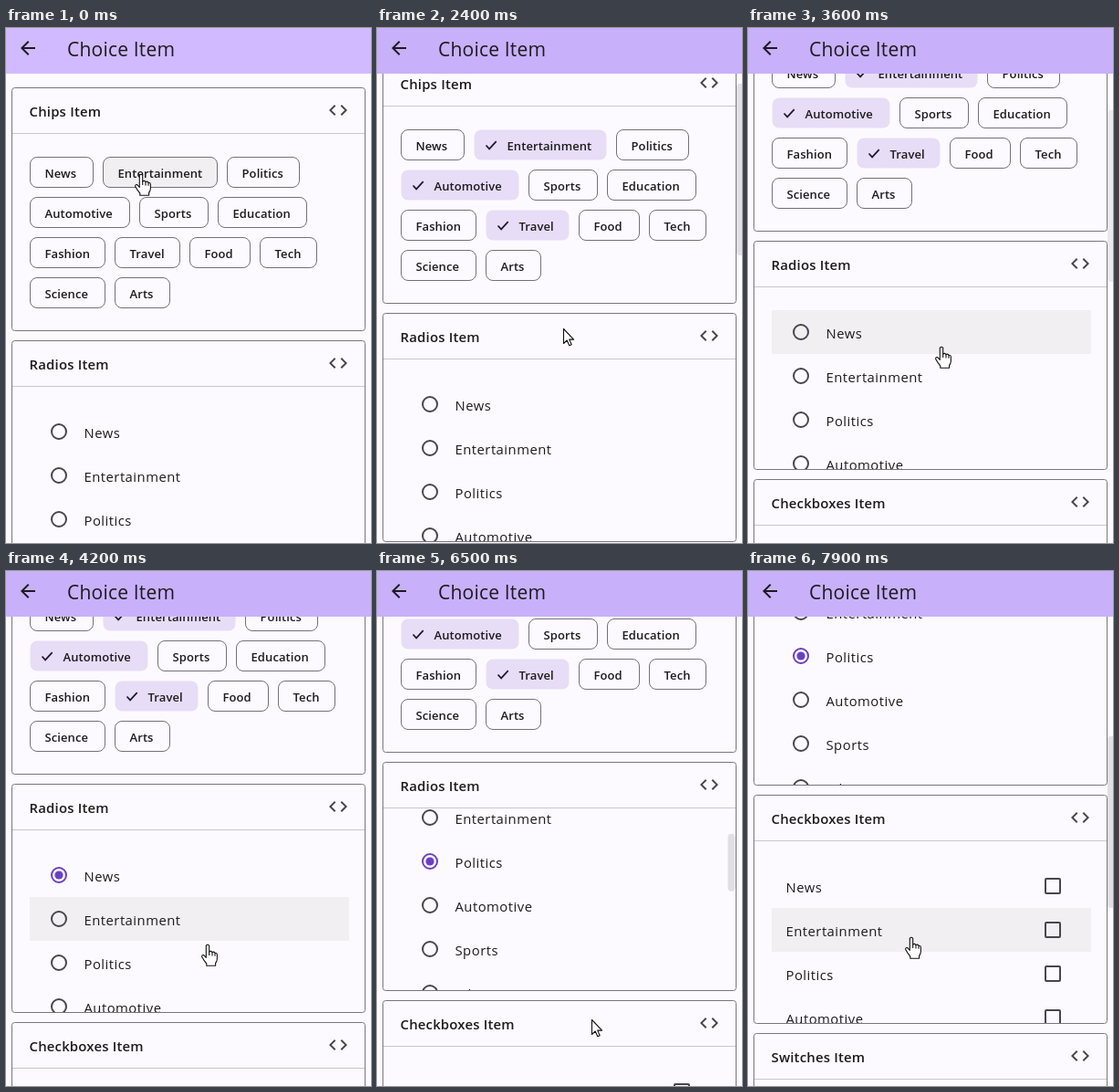
Recreate the animation shown at these times as an HTML page. Size 400 by 564 pixels, loop 8 s.

```html
<!DOCTYPE html>
<html lang="en">
<head>
<meta charset="utf-8">
<title>Choice Item</title>
<style>
  html, body { margin: 0; width: 100%; height: 100%; overflow: hidden; background: #fdfaff; }
  svg { display: block; width: 400px; height: 564px; font-family: "Open Sans", "Noto Sans", sans-serif; fill: #1d1b1e; }
  .title { font-size: 21px; letter-spacing: .2px; }
  .head { font-size: 14.9px; font-weight: 600; letter-spacing: .2px; }
  .chip { font-size: 13px; font-weight: 600; letter-spacing: .1px; }
  .row { font-size: 14.8px; letter-spacing: .5px; }
  .card { fill: none; stroke: #79757e; }
  .rule { stroke: #cbc6cd; }
  .icon { fill: #49454f; }
  .ring { fill: none; stroke: #49454f; stroke-width: 2; }
  .tick { fill: none; stroke: #1d192b; stroke-width: 1.7; stroke-dasharray: 18; }
  .bar { fill: #e2dfe4; }
  .cursor { fill: #fff; stroke: #111; stroke-width: 1.1; stroke-linejoin: round; }
</style>
</head>
<body>
<svg id="stage" viewBox="0 0 400 564">
  <defs><clipPath id="list"><rect x="7" y="51" width="386" height="199"/></clipPath></defs>
</svg>
<script>
const LOOP = 8000, STEP = 100;
const stage = document.getElementById("stage");
const INK = "#49454f", ACCENT = "#6a40c0";

const NAMES = ["News", "Entertainment", "Politics", "Automotive", "Sports", "Education",
  "Fashion", "Travel", "Food", "Tech", "Science", "Arts"];
const CHIP_WIDTHS = [70, 126, 80, 110, 76, 98, 83, 72, 67, 63, 83, 61];
const CHIP_ROWS = [[0, 1, 2], [3, 4, 5], [6, 7, 8, 9], [10, 11]];

// Tracks: time, then values, linear in between
const SCROLL = [[2100, 0], [2300, 15], [2500, 45], [2700, 75], [2900, 94], [3000, 101], [3300, 109],
  [6400, 109], [6500, 133], [7000, 268], [7300, 322], [7600, 348], [7900, 358]];
const LIST_SCROLL = [[4900, 0], [5200, 30], [5600, 70], [5900, 87]];
const POINTER = [[100, 148, 160], [700, 149, 158], [800, 149, 158], [900, 142, 180], [1000, 132, 202],
  [1100, 136, 205], [1200, 159, 238], [1700, 160, 242], [1800, 165, 256], [2000, 200, 320],
  [2100, 200, 320], [2900, 211, 345], [3500, 211, 345], [4000, 217, 366], [4200, 221, 409],
  [4400, 222, 424], [5300, 222, 426], [6200, 234, 488], [6300, 235, 491], [6500, 235, 491],
  [7000, 245, 457], [7300, 240, 452], [7600, 200, 410], [7900, 179, 401]];
const OUTER_BAR = [[2100, 0], [2300, 1], [3500, 1], [3800, 0], [6500, 0], [6700, 1]];
const LIST_BAR = [[4800, 0], [5000, 1], [6500, 1], [6800, 0]];
const PICKED = {
  1: [[0, 0], [100, .3], [300, 1]],
  3: [[900, 0], [1100, 1]],
  7: [[1200, 0], [1500, 1]]
};
const RADIO = {
  0: [[3600, 0], [3800, 1], [4500, 1], [4700, 0]],
  2: [[4500, 0], [4700, 1]]
};
const HOVER = [[0, "chip1"], [900, "chip3"], [1200, "chip7"], [1800, ""], [2800, "radio0"],
  [3900, "radio1"], [4300, "radio2"], [4900, "radio3"], [5700, ""], [6800, "check0"], [7500, "check1"]];

function add(parent, tag, attrs = {}, text) {
  const node = document.createElementNS("http://www.w3.org/2000/svg", tag);
  set(node, attrs);
  if (text) node.textContent = text;
  parent.append(node);
  return node;
}
function set(node, attrs) {
  for (const key in attrs) node.setAttribute(key, attrs[key]);
}
const move = (node, x, y) => set(node, { transform: `translate(${x} ${y})` });

function track(keys, t) {
  if (!keys) return [0];
  const i = keys.findIndex(k => k[0] > t);
  if (i < 0) return keys[keys.length - 1].slice(1);
  if (i === 0) return keys[0].slice(1);
  const a = keys[i - 1], b = keys[i], p = (t - a[0]) / (b[0] - a[0]);
  return a.slice(1).map((v, n) => v + (b[n + 1] - v) * p);
}

const page = add(stage, "g");
const hoverNodes = {};

function card(title, y, height) {
  const g = add(page, "g", { transform: `translate(0 ${y})` });
  add(g, "rect", { class: "card", x: 6.5, y: .5, width: 387, height, rx: 3 });
  add(g, "path", { class: "rule", d: "M7 50.5H393" });
  add(g, "text", { class: "head", x: 25.5, y: 32 }, title);
  add(g, "path", { class: "icon", transform: "translate(352 13)",
    d: "M9.4 16.6L4.8 12l4.6-4.6L8 6l-6 6 6 6zM14.6 16.6l4.6-4.6-4.6-4.6L16 6l6 6-6 6z" });
  return g;
}

function list(parent, kind, labelX, mark) {
  const g = add(add(parent, "g", { "clip-path": "url(#list)" }), "g");
  const marks = NAMES.map((name, i) => {
    const row = add(g, "g", { transform: `translate(0 ${76 + 48 * i})` });
    hoverNodes[kind + i] = add(row, "rect", { x: 26, width: 350, height: 48, fill: "#f1eff2" });
    add(row, "text", { class: "row", x: labelX, y: 31 }, name);
    return mark(row);
  });
  return { g, marks };
}

const chipCard = card("Chips Item", 65, 266);
const chips = NAMES.map((name, i) => {
  const g = add(chipCard, "g");
  return {
    g, i,
    box: add(g, "rect", { x: .5, y: .5, height: 33, rx: 7.5 }),
    tick: add(g, "path", { class: "tick", d: "M13.5 17.5l3.6 3.9 7.6-8.2" }),
    label: add(g, "text", { class: "chip", y: 23 }, name)
  };
});

const radioCard = card("Radios Item", 342, 250);
const radios = list(radioCard, "radio", 85.5, row => ({
  ring: add(row, "circle", { class: "ring", cx: 58, cy: 24, r: 8 }),
  dot: add(row, "circle", { cx: 58, cy: 24, fill: ACCENT })
}));
const listBar = add(radioCard, "rect", { class: "bar", x: 384.5, width: 8, height: 63, rx: 4 });

list(card("Checkboxes Item", 603, 250), "check", 41.5, row =>
  add(row, "rect", { class: "ring", x: 326, y: 16, width: 16, height: 16, rx: 1 }));
card("Switches Item", 864, 250);

const pageBar = add(stage, "rect", { class: "bar", x: 394, width: 10, height: 188, rx: 4 });
const appBar = add(stage, "rect", { width: 400, height: 50 });
add(stage, "path", { transform: "translate(12 10)",
  d: "M20 11H7.83l5.59-5.59L12 4l-8 8 8 8 1.41-1.41L7.83 13H20z" });
add(stage, "text", { class: "title", x: 67, y: 31 }, "Choice Item");

const arrow = add(stage, "path", { class: "cursor",
  d: "M.5 .5V16.5L4.2 13L6.8 18.8L9.2 17.7L6.7 12.1H11.6Z" });
const hand = add(stage, "g", { class: "cursor" });
add(hand, "path", { d: "M-1.7 1.4Q0 -1 1.7 1.4V8Q3.6 6.5 5 8.6Q6.7 7.3 8 9.4Q10.3 8.8 10.4 11.5V16Q10 19 8.6 20.5V23.3H-1.2V21Q-4 18 -6.3 13.6Q-6.6 11 -4.3 11.6L-1.7 14.4Z" });
add(hand, "path", { d: "M1.7 8V12M5 8.6V12.4M8 9.4V12.8", fill: "none" });

function drawChips(t, hover) {
  CHIP_ROWS.forEach((row, r) => {
    let x = 26;
    for (const i of row) {
      const chip = chips[i], p = track(PICKED[i], t)[0], hot = hover === "chip" + i;
      const width = CHIP_WIDTHS[i] + 20 * p;
      move(chip.g, x, 76 + 44 * r);
      set(chip.box, {
        width: width - 1,
        fill: p > 0 ? (hot || i === 3 && t < 1400 ? "#dfd5ec" : "#e7ddf7") : hot ? "#f1eff2" : "#fdfaff",
        stroke: p > 0 ? "none" : "#747079"
      });
      set(chip.tick, { "stroke-dashoffset": 18 * (1 - p), opacity: p > 0 ? 1 : 0 });
      set(chip.label, { x: 16.5 + 20 * p });
      x += width + 10;
    }
  });
}

function draw(t) {
  const hover = HOVER.filter(h => h[0] <= t).pop()[1];
  const scroll = Math.round(track(SCROLL, t)[0]);
  const inner = Math.round(track(LIST_SCROLL, t)[0]);
  const [x, y] = track(POINTER, t).map(Math.round);

  move(page, 0, -scroll);
  move(radios.g, 0, -inner);
  set(appBar, { fill: scroll > 0 ? "#c9b0fb" : "#d1baff" });
  set(pageBar, { y: 50 + .366 * scroll, opacity: track(OUTER_BAR, t)[0] });
  set(listBar, { y: 51 + .32 * inner, opacity: track(LIST_BAR, t)[0] });

  drawChips(t, hover);
  radios.marks.forEach(({ ring, dot }, i) => {
    const p = track(RADIO[i], t)[0];
    ring.style.stroke = p > .4 ? ACCENT : INK;
    set(dot, { r: 4.6 * p });
  });
  for (const id in hoverNodes) set(hoverNodes[id], { opacity: id === hover ? 1 : 0 });

  move(arrow, x, y);
  move(hand, x, y);
  set(arrow, { opacity: hover ? 0 : 1 });
  set(hand, { opacity: hover ? 1 : 0 });
}

const start = performance.now();
function tick() {
  const t = (performance.now() - start) % LOOP;
  draw(Math.floor(t / STEP) * STEP);
  requestAnimationFrame(tick);
}
draw(0);
requestAnimationFrame(tick);
</script>
</body>
</html>
```
